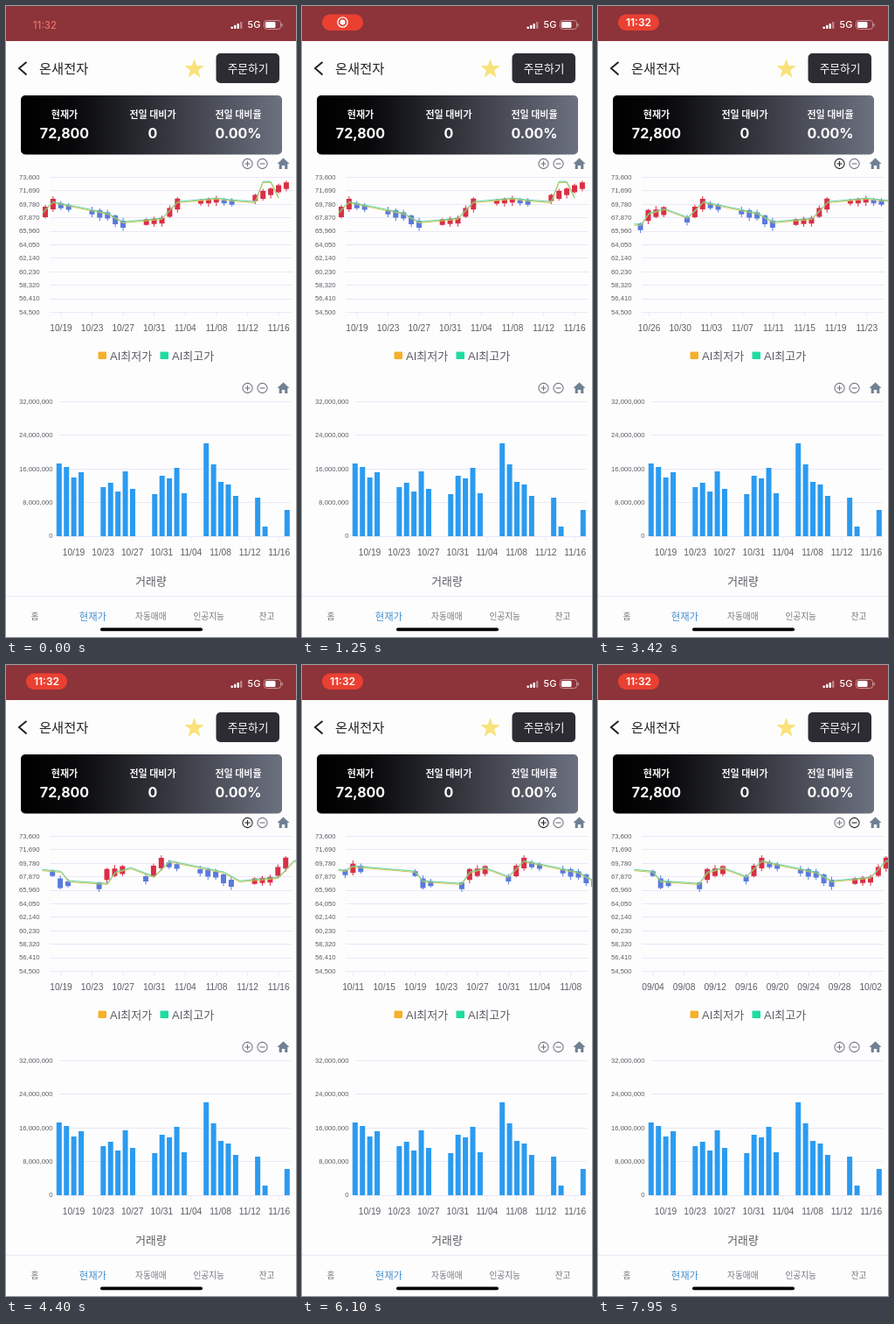
Animation, 332 px wide and 720 px high, one loop 8 s. Source, as an HTML page with a canvas:

```html
<!DOCTYPE html>
<html lang="ko">
<head>
<meta charset="utf-8">
<style>
html, body { margin: 0; width: 100%; height: 100%; overflow: hidden; background: #fefdfe; }
canvas { display: block; width: 332px; height: 720px; }
</style>
</head>
<body>
<canvas id="stage"></canvas>
<script>
const W = 332, H = 720, LOOP = 8000;
const canvas = document.getElementById('stage');
const ratio = window.devicePixelRatio || 1;
canvas.width = W * ratio;
canvas.height = H * ratio;
const c = canvas.getContext('2d');
c.scale(ratio, ratio);

const SANS = '"Liberation Sans", "Noto Sans CJK KR", "Noto Sans CJK", sans-serif';
const KOREAN = '"Noto Sans CJK KR", "Noto Sans CJK", sans-serif';
const BOLD = 'Inter, "Noto Sans CJK KR", sans-serif';
const PAPER = '#fefdfe', GRID = '#e9e8f6', INK = '#5c5c63';
const RED = '#d92f45', BLUE = '#597adf';
const DAY = 8.9, FIRST_X = 45;

// Key points [day, y]; day 0 is 10/17.
const trend = [
  [-31, 208], [-29, 211], [-26, 230], [-22, 235], [-21, 230], [-13, 236],
  [-12, 247], [-7, 250], [-6, 237], [-4, 232], [-1, 242], [1, 224], [2, 226],
  [8, 237], [10, 247], [15, 243], [17, 224], [22, 220], [24, 222]
];
const prices = [...trend, [27, 217], [31, 203]];
const forecast = [...trend, [27, 224], [28, 201], [29, 201], [30, 219]];

const volumes = [83, 79, 67, 73, 56, 61, 51, 74, 54, 48, 69, 66, 78, 49,
  106, 82, 62, 59, 46, 44, 11, 0, 0, 30];

// Button taps [time, chart offset, axis offset], offsets in days.
const taps = [
  [0, 0, 0], [3050, 7.5, 7.5], [4100, 15, 0], [5200, 22.5, -7.5],
  [6250, 30, -15], [7250, 15, -45]
];

const clamp = v => Math.max(0, Math.min(1, v));
const ease = p => (1 - Math.cos(Math.PI * clamp(p))) / 2;
const mix = (a, b, p) => a + (b - a) * p;
const random = n => Math.abs(Math.sin(n * 12.9898 + 4.1) * 43758.5453) % 1;

function sample(points, day) {
  const i = Math.max(1, points.findIndex(p => p[0] >= day));
  const [x0, y0] = points[i - 1], [x1, y1] = points[i];
  return mix(y0, y1, (day - x0) / (x1 - x0));
}

// Weekdays, without the autumn holidays.
function tradingDays(from, to) {
  const days = [];
  for (let d = from; d <= to; d++) {
    const weekend = (d + 36) % 7 > 4;
    const holiday = d === -8 || (d > -20 && d < -13);
    if (!weekend && !holiday) days.push(d);
  }
  return days;
}

const candles = tradingDays(-29, 31).map(day => {
  const y = sample(prices, day) + 2;
  const slope = sample(prices, day) - sample(prices, day - 1);
  return {
    day, y,
    half: (3 + 4 * random(day) + Math.min(8, Math.abs(slope)) * 0.8) / 2,
    up: 1 + 3 * random(day + 100),
    down: 1 + 3 * random(day + 200),
    color: slope < 0 ? RED : BLUE
  };
});

function text(str, x, y, size, color, align = 'center', font = SANS, weight = 400) {
  c.font = `${weight} ${size}px ${font}`;
  c.fillStyle = color;
  c.textAlign = align;
  c.fillText(str, x, y + size * 0.36);
}

function rect(x, y, w, h, color, r = 0) {
  c.fillStyle = color;
  c.beginPath();
  c.roundRect(x, y, w, h, r);
  c.fill();
}

function path(points, color, width = 1) {
  c.strokeStyle = color;
  c.lineWidth = width;
  c.beginPath();
  points.forEach(([x, y]) => c.lineTo(x, y));
  c.stroke();
}

function circle(x, y, r, color, width) {
  c.strokeStyle = color;
  c.lineWidth = width;
  c.beginPath();
  c.arc(x, y, r, 0, 7);
  c.stroke();
}

function statusBar(t) {
  rect(0, 0, W, 40, '#8d333a');
  const shown = clamp((t - 1050) / 150);
  c.globalAlpha = 1 - clamp((t - 830) / 100);
  text('11:32', 44.5, 21.5, 11.5, '#e5706a', 'center', BOLD, 500);
  c.globalAlpha = shown;
  rect(23, 9.5, 47, 18.5, '#ea4032', 9);
  if (t < 2300) {
    circle(46.5, 18.5, 5.6, '#fff', 1.4);
    circle(46.5, 18.5, 1.5, '#fff', 3);
  } else {
    text('11:32', 46.5, 18.7, 12, '#fff', 'center', BOLD, 600);
  }
  c.globalAlpha = 1;
  for (let i = 0; i < 4; i++) {
    const h = 2.5 + i * 1.8;
    rect(257.5 + i * 3.5, 26 - h, 2.4, h, i < 3 ? '#fff' : '#bd8489', 0.7);
  }
  text('5G', 284, 21.5, 11, '#fff', 'center', BOLD, 500);
  c.strokeStyle = '#c5959a';
  c.lineWidth = 1;
  c.beginPath();
  c.roundRect(295.5, 16.5, 19, 10, 3);
  c.stroke();
  rect(297, 18, 11.5, 7, '#fff', 1.5);
  rect(315.5, 20, 1.3, 3.5, '#c5959a');
}

function header() {
  path([[23.5, 64], [15, 71], [23.5, 78.5]], '#222226', 2);
  text('온새전자', 38, 71, 15.3, '#232327', 'left', KOREAN, 500);
  c.fillStyle = '#f8e27c';
  c.beginPath();
  for (let i = 0; i < 10; i++) {
    const a = i * Math.PI / 5 - Math.PI / 2, r = i % 2 ? 4.8 : 12;
    c.lineTo(215.5 + r * Math.cos(a), 72 + r * Math.sin(a));
  }
  c.fill();
  rect(240.5, 54, 72.5, 34, '#2d2c33', 5);
  text('주문하기', 277, 71, 12.7, '#fff', 'center', KOREAN);

  const shade = c.createLinearGradient(17, 0, 316, 0);
  shade.addColorStop(0, '#000');
  shade.addColorStop(0.2, '#08080a');
  shade.addColorStop(1, '#6c7180');
  rect(17, 102, 299, 67.5, shade, 5);
  [['현재가', '72,800', 67], ['전일 대비가', '0', 168], ['전일 대비율', '0.00%', 266]]
    .forEach(([label, value, x]) => {
      text(label, x, 124, 11, '#f5f5f8', 'center', KOREAN, 700);
      text(value, x, 145, 16, '#fff', 'center', BOLD, 700);
    });
}

function tools(y, active) {
  [276.5, 293.5].forEach((x, i) => {
    const color = active === i ? '#25252b' : '#717783';
    circle(x, y, 5.6, color, 1.1);
    path([[x - 3, y], [x + 3, y]], color, 1.1);
    if (!i) path([[x, y - 3], [x, y + 3]], color, 1.1);
  });
  c.fillStyle = '#6e8192';
  c.beginPath();
  c.moveTo(310.5, y);
  c.lineTo(317.5, y - 6.5);
  c.lineTo(324.5, y);
  c.fill();
  rect(312.7, y - 1, 9.6, 7, '#6e8192');
  rect(315.8, y + 2, 3.4, 4, PAPER);
}

function dateAxis(offset, x, dayWidth, lineY, labelY) {
  const first = Math.floor(offset);
  for (let i = 0; i < 8; i++) {
    const date = new Date(2023, 9, 19 + first + i * 4);
    const [month, day] = [date.getMonth() + 1, date.getDate()]
      .map(n => String(n).padStart(2, '0'));
    const cx = x + (first - offset + i * 4) * dayWidth;
    path([[cx, lineY], [cx, lineY + 5]], GRID);
    text(`${month}/${day}`, cx, labelY, 10.2, INK);
  }
}

function valueAxis(max, step, count, y0, gap, labelX, left, right) {
  for (let i = 0; i < count; i++) {
    const y = y0 + i * gap, line = Math.round(y) + 0.5;
    text((max - i * step).toLocaleString('en-US'), labelX, y, 7.7, INK, 'right');
    path([[left, line], [right, line]], GRID);
  }
}

function priceChart(t) {
  const k = taps.findLastIndex(([at]) => at <= t);
  const [at, offset, axisOffset] = taps[k];
  const from = taps[Math.max(0, k - 1)][1];
  const origin = duration => FIRST_X + DAY * mix(from, offset, ease((t - at) / duration));

  valueAxis(73600, 1910, 11, 195, 15.4, 38.5, 50, 328);
  dateAxis(axisOffset, 63, DAY, 349.5, 367.5);

  c.save();
  c.beginPath();
  c.rect(41.5, 185, 291, 165);
  c.clip();
  const candleX = origin(400), lineX = origin(300);
  for (const { day, y, half, up, down, color } of candles) {
    const x = candleX + day * DAY;
    path([[x, y - half - up], [x, y + half + down]], color);
    rect(x - 3, y - half, 6, half * 2, color);
  }
  const trace = dy => forecast.map(([d, y]) => [lineX + d * DAY, y + dy]);
  path(trace(-0.8), '#5fd0a4');
  path(trace(0.5), '#c3c64f');
  c.restore();

  tools(180, t < taps[1][0] ? -1 : t < 7150 ? 0 : 1);
  rect(105.5, 394.5, 9.5, 8.5, '#f6b02a', 1);
  text('AI최저가', 119, 399, 13, INK, 'left');
  rect(176.5, 394.5, 9.5, 8.5, '#1cdc9f', 1);
  text('AI최고가', 190, 399, 13, INK, 'left');
}

function volumeChart() {
  tools(436, -1);
  valueAxis(32e6, 8e6, 5, 451, 38.4, 53.5, 61, 326);
  tradingDays(0, 31).forEach((day, i) => {
    rect(57.8 + day * 8.42, 605 - volumes[i], 6, volumes[i], '#2b9bf0');
  });
  dateAxis(0, 77.5, 8.4, 605.5, 623);
  text('거래량', 166, 656, 12.8, INK, 'center', KOREAN);
}

function tabBar() {
  path([[0, 673.5], [W, 673.5]], '#e9e8f4');
  ['홈', '현재가', '자동매매', '인공지능', '잔고'].forEach((label, i) => {
    const [size, color] = i === 1 ? [11.3, '#438fcb'] : [9.7, '#77777e'];
    text(label, 33 + i * 66.4, 697, size, color, 'center', KOREAN);
  });
  rect(108, 709.5, 117, 3.7, '#000', 2);
}

function draw() {
  const t = performance.now() % LOOP;
  rect(0, 0, W, H, PAPER);
  statusBar(t);
  header();
  priceChart(t);
  volumeChart();
  tabBar();
  requestAnimationFrame(draw);
}
draw();
</script>
</body>
</html>
```
